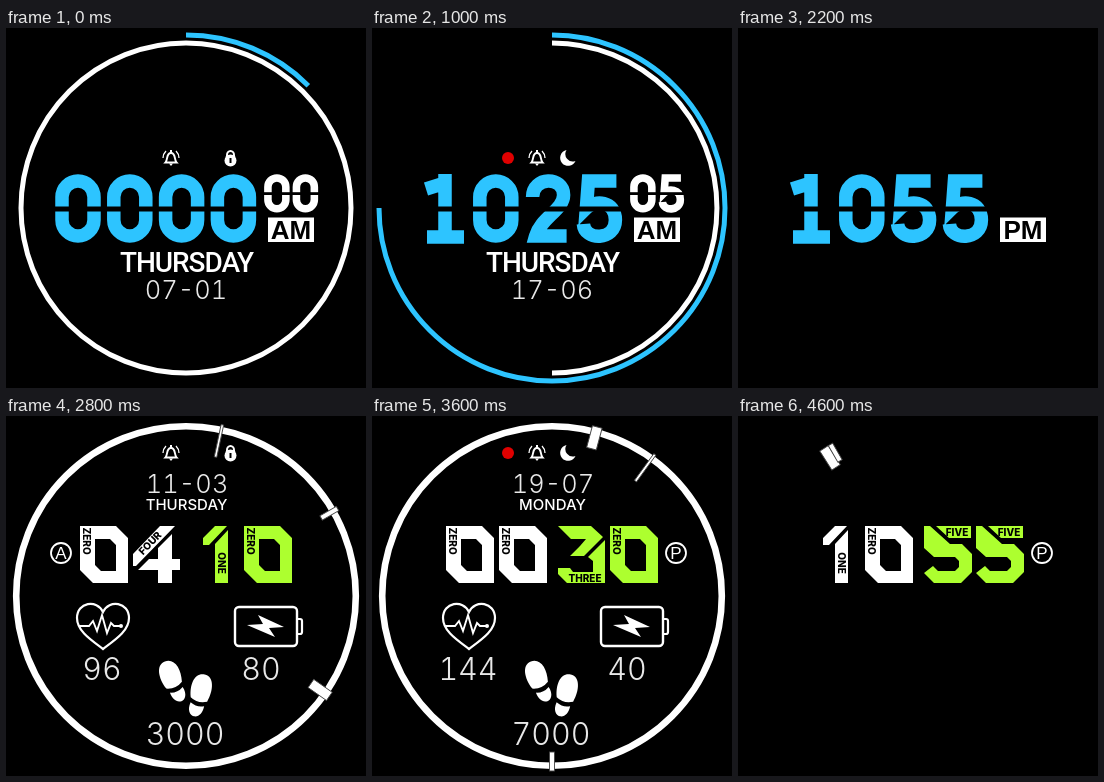
Write an HTML page that moves like this. It is 360x360 px and loops after 4800 ms.

```html
<!DOCTYPE html>
<html lang="en">
<head>
<meta charset="utf-8">
<title>Two watch faces</title>
<style>
  html, body { margin: 0; width: 100%; height: 100%; overflow: hidden; background: #000; }
  svg { display: block; width: 100vw; height: 100vh; }
  text { text-anchor: middle; fill: #fff; }
  .thin { font-family: Inter, sans-serif; font-weight: 300; font-variant-numeric: tabular-nums; fill: #e8e8e8; }
  .day { font-family: Roboto, sans-serif; font-weight: 500; }
  .wide { font-family: Inter, sans-serif; font-weight: 500; }
  .box { font: bold 26px "Liberation Sans", sans-serif; fill: #000; }
  .tag { font: 800 10px Inter, sans-serif; fill: #000; }
  .mark { font: 17px "Liberation Sans", sans-serif; }
</style>
</head>
<body>
<svg id="stage" viewBox="0 0 360 360"></svg>
<script>
const STEP = 200, PER_FACE = 12, AWAKE = 10;
const BLUE = '#2dc4ff', GREEN = '#adff2f', WHITE = '#fff';
const DAYS = ['SUNDAY', 'MONDAY', 'TUESDAY', 'WEDNESDAY', 'THURSDAY', 'FRIDAY', 'SATURDAY'];

// Centre lines of the stencil digits in a 46 x 69 cell
const STENCIL = [
  'M7 23a16 16 0 0 1 32 0V46a16 16 0 0 1-32 0Z',
  'M24 0V62M5 15L24 9M6 63H43',
  'M8 23C8 2 39 2 39 21C39 36 16 44 11 62H42',
  'M8 20C10 2 38 2 38 20C38 31 30 34 20 34C30 34 39 37 39 48C39 67 8 67 7 48',
  'M31 69V7H27L7 49H46',
  'M40 7H12L10 34C18 26 39 26 39 46C39 67 8 67 7 50',
  'M38 20C36 2 7 2 7 23V46C7 67 39 67 39 46C39 26 10 28 8 44',
  'M5 7H38L18 69',
  'M23 7C3 7 3 34 23 34S43 7 23 7ZM23 34C1 34 1 62 23 62S45 34 23 34Z',
  'M8 49C10 67 39 67 39 46V23C39 2 7 2 7 23C7 43 36 41 38 25'
];

// Block digits in a 48 x 57 cell: outline, word, word centre, word angle
const BLOCK = {
  0: ['M0 0H36L48 12V57H13L0 44ZM15 13V39L21 45H36V19L30 13Z', 'ZERO', 7, 15, 90],
  1: ['M11 12L23 0H35L17 19H11ZM36 4V57H23V18Z', 'ONE', 29.5, 37, 90],
  2: ['M0 0H38L48 11V34H15V44H48V57H0V30L8 22H33V13H10Z', 'TWO', 28, 51, 0],
  3: ['M0 0H33L45 11L26 30H12L22 20L28 13H13ZM47 14V57H9L0 48V42H12L15 46H35V35L30 31Z', 'THREE', 27, 52, 0],
  4: ['M0 28L27 0H42L3 40H0ZM39 8V33H47V44H39V57H25V44H5L16 33H25V22Z', 'FOUR', 17, 17, -46],
  5: ['M12 0H47V12H25ZM0 0H6L26 18H38L48 28V46L37 57H10L0 47L9 40L14 45H31L35 41V35L31 31H10L0 22Z', 'FIVE', 33, 6, 0],
  6: ['M0 0H36L46 10H15V22H37L48 33V57H12L0 45ZM14 34V44H34V34Z', 'SIX', 25, 51, 0],
  8: ['M8 0H40L48 8V22L42 28L48 34V57H0V34L6 28L0 22V8ZM14 13V23H34V13ZM14 34V44H34V34Z', 'EIGHT', 24, 51, 0]
};

const pad = n => String(n).padStart(2, '0');
const group = (transform, body) => `<g transform="${transform}">${body}</g>`;
const text = (cls, x, y, size, value, extra = '') =>
  `<text class="${cls}" x="${x}" y="${y}" ${size ? `style="font-size:${size}px"` : ''} ${extra}>${value}</text>`;
const line = (d, width, color = WHITE) =>
  `<path d="${d}" fill="none" stroke="${color}" stroke-width="${width}"/>`;

function stateAt(k) {
  const month = k + 1, day = 7 + 2 * k, hour = 2 * k, minute = 5 * k;
  return {
    k, hour, minute, second: k, pm: hour >= 12,
    clock: pad(hour % 12) + pad(minute),
    date: pad(day) + '-' + pad(month),
    weekday: DAYS[new Date(2021, month - 1, day).getDay()],
    pulse: 72 + 12 * k, battery: 100 - 10 * k, steps: 1000 * (k + 1),
    awake: k < AWAKE
  };
}

function arc(radius, share, color) {
  if (share >= 1) return `<circle cx="180" cy="180" r="${radius}" fill="none" stroke="${color}" stroke-width="5"/>`;
  const a = share * 2 * Math.PI;
  const x = 180 + radius * Math.sin(a), y = 180 - radius * Math.cos(a);
  return line(`M180 ${180 - radius}A${radius} ${radius} 0 ${+(share > 0.5)} 1 ${x} ${y}`, 5, color);
}

function statusIcons(k, y) {
  const dot = '<circle r="6" fill="#e00000"/>';
  const bell = line('M-5.5 4.5C-3 2-5-5 0-5S3 2 5.5 4.5Z', 1.9) +
    '<path d="M-2 5.5H2L0 8ZM-1-8H1V-5H-1Z" fill="#fff"/>' +
    line('M-5-7Q-8-4-8 0M5-7Q8-4 8 0', 1.3);
  const moon = '<path d="M-1-8A8 8 0 1 0 8 3A7.5 7.5 0 0 1-1-8Z" fill="#fff"/>';
  const lock = line('M-3.5 0V-3a3.5 4 0 0 1 7 0V0', 2) +
    '<circle cy="2.5" r="6" fill="#fff"/><path d="M-1 0H1V5H-1Z"/>';
  return [
    [k >= 5, 136, dot], [k < 8, 165, bell], [k >= 4 && k < 8, 195.5, moon], [k < 4, 224.5, lock]
  ].map(([on, x, icon]) => on ? group(`translate(${x} ${y})`, icon) : '').join('');
}

function stencil(value, x, y, scale, pitch, color) {
  return [...value].map((d, i) => group(`translate(${x + i * pitch} ${y}) scale(${scale})`,
    line(STENCIL[d], 13.5, color) + '<path d="M-2 32.5H50V37.5H-2Z"/>')).join('');
}

function stencilFace(s) {
  let out = stencil(s.clock, 49, 146, 1, 51.8, BLUE) +
    '<rect x="262" y="189.5" width="46" height="24.5" fill="#fff"/>' +
    text('box', 285, 211, 0, s.pm ? 'PM' : 'AM');
  if (s.awake) {
    out += arc(173, s.steps / 8000, BLUE) + arc(165, s.battery / 100, WHITE) +
      statusIcons(s.k, 130) + stencil(pad(s.second), 258, 146, 0.56, 28.5, WHITE) +
      text('day', 180.5, 243.5, 28, s.weekday, 'letter-spacing="-1"') +
      text('thin', 180, 270.5, 25.5, s.date);
  }
  return out;
}

function block(digit, x, color) {
  const [d, word, wx, wy, angle] = BLOCK[digit];
  return group(`translate(${x} 110)`,
    `<path d="${d}" fill="${color}" fill-rule="evenodd"/>` +
    group(`translate(${wx} ${wy}) rotate(${angle})`, text('tag', 0, 3.6, 0, word)));
}

const hand = (angle, width, inner) => group(`rotate(${angle} 180 180)`,
  `<rect x="${180 - width / 2}" y="5" width="${width}" height="${175 - inner}" fill="#fff" stroke="#444" stroke-width=".9"/>`);

function foot(x, y, angle, side) {
  return group(`translate(${x} ${y}) rotate(${angle}) scale(${side} 1)`,
    '<path d="M-9 8C-13-4-11-18-1-18C9-18 12-6 8 7Q0 12-9 8ZM-7 13Q0 16 7 12C9 20 5 25 1 25C-4 25-7 20-7 13Z" fill="#fff"/>');
}

function healthIcons() {
  return line('M97 233C85 224 71 215 71 202C71 186 91 183 97 196C103 183 123 186 123 202C123 215 109 224 97 233Z', 2.2) +
    line('M73 210H83L87 205L91 215L96 199L101 217L105 207L108 210H115', 1.9) +
    '<circle cx="115" cy="210" r="2" fill="#fff"/>' +
    '<rect x="229" y="191" width="62" height="39" rx="4" fill="none" stroke="#fff" stroke-width="2.4"/>' +
    line('M291 203H294Q296 203 296 205V216Q296 218 294 218H291', 2.2) +
    '<path d="M252 199L278 211L263 212L269 221L241 209L257 208Z" fill="#fff"/>' +
    foot(166, 262, -20, 1) + foot(194, 276, 12, -1);
}

function blockFace(s) {
  const mx = s.pm ? 304 : 55;
  let out = [74, 127, 186, 238].map((x, i) => block(s.clock[i], x, i < 2 ? WHITE : GREEN)).join('') +
    `<circle cx="${mx}" cy="137" r="10" fill="none" stroke="#fff" stroke-width="1.8"/>` +
    text('mark', mx, 143, 0, s.pm ? 'P' : 'A');
  if (s.awake) {
    out += '<circle cx="180" cy="180" r="169.8" fill="none" stroke="#fff" stroke-width="6.6"/>' +
      statusIcons(s.k, 37) + text('thin', 181, 76.5, 25.5, s.date) +
      text('wide', 180.5, 94, 15, s.weekday) + healthIcons() +
      text('thin', 96, 264, 30.5, s.pulse) + text('thin', 255, 264, 30.5, s.battery) +
      text('thin', 179, 329, 30.5, s.steps);
  }
  out += hand(s.hour * 30 + s.minute / 2, 10, 152.5) + hand(s.minute * 6, 5, 156);
  return s.awake ? out + hand(s.second * 6, 2.6, 142) : out;
}

const stage = document.getElementById('stage');
const start = performance.now();
let shown = -1;

function draw(now) {
  const step = Math.floor(Math.max(0, now - start) / STEP) % (2 * PER_FACE);
  if (step !== shown) {
    shown = step;
    const state = stateAt(step % PER_FACE);
    stage.innerHTML = step < PER_FACE ? stencilFace(state) : blockFace(state);
  }
  requestAnimationFrame(draw);
}
draw(start);
</script>
</body>
</html>
```
